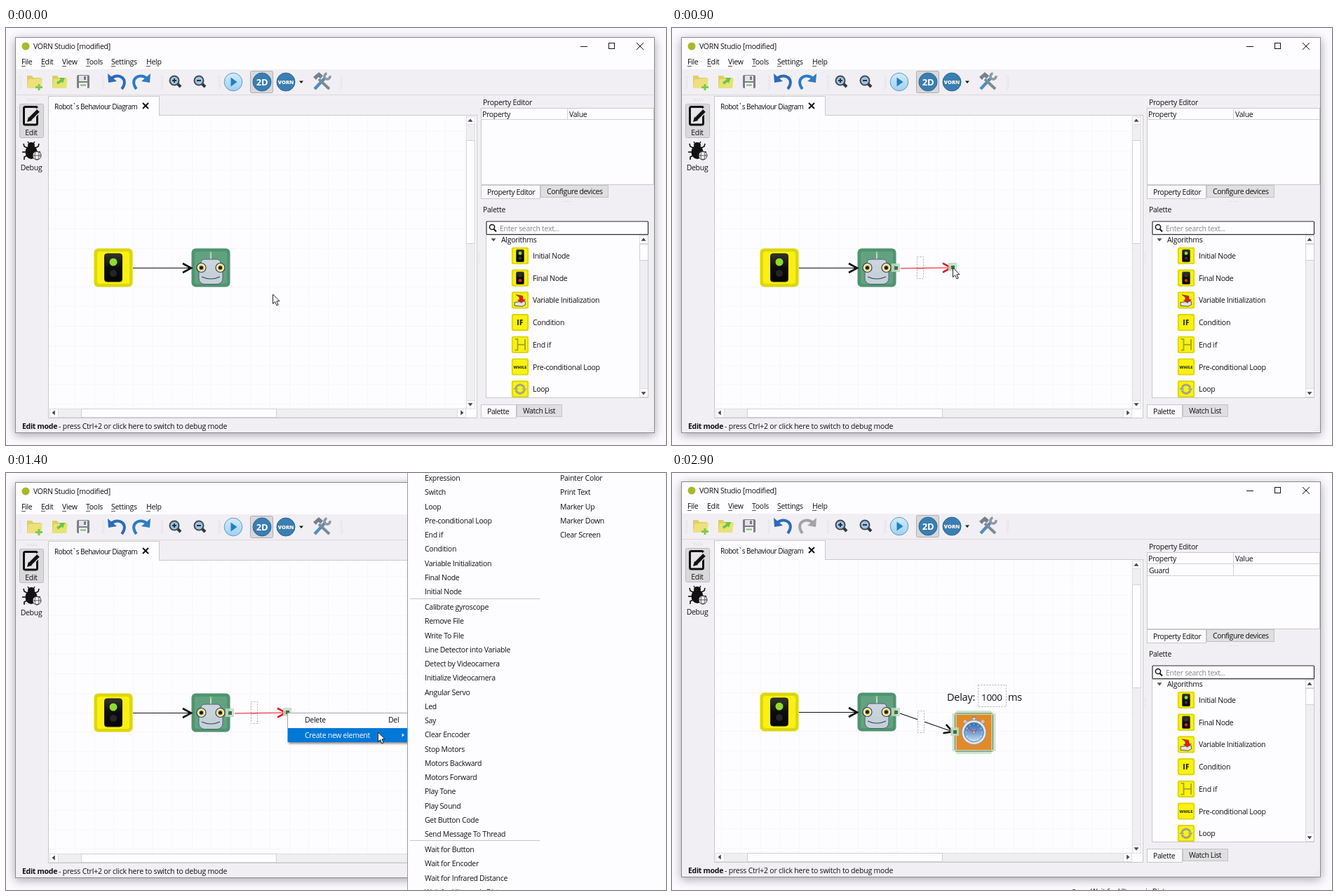
Animation, 941 px wide and 595 px high, one loop 4900 ms. Source, as an HTML page with a canvas:

```html
<!DOCTYPE html>
<html lang="en">
<head>
<meta charset="utf-8">
<title>Diagram editor</title>
<style>
html, body { margin: 0; width: 100%; height: 100%; overflow: hidden; background: #fcfaff; }
canvas { display: block; }
</style>
</head>
<body>
<canvas id="stage" width="941" height="595"></canvas>
<script>
const ctx = document.getElementById('stage').getContext('2d');
const LOOP = 4900, STEP = 100, LAST_STEP = 19, RESULT_AT = 2900;
const SANS = '"Open Sans", "Noto Sans", sans-serif';
const WHITE = '#fdfcff', PANEL = '#f1eff3', INK = '#111', EDGE = '#c9c8ca', BLUE = '#0078d7';

// ---- drawing helpers ----
function rect(x, y, w, h, fill, stroke) {
  if (fill) { ctx.fillStyle = fill; ctx.fillRect(x, y, w, h); }
  if (stroke) { ctx.strokeStyle = stroke; ctx.lineWidth = 1; ctx.strokeRect(x + .5, y + .5, w - 1, h - 1); }
}
function paint(fill, stroke, width = 1) {
  if (fill) { ctx.fillStyle = fill; ctx.fill(); }
  if (stroke) { ctx.strokeStyle = stroke; ctx.lineWidth = width; ctx.stroke(); }
}
function round(x, y, w, h, r, fill, stroke, width) {
  ctx.beginPath(); ctx.roundRect(x, y, w, h, r); paint(fill, stroke, width);
}
function oval(x, y, rx, ry, fill, stroke, width) {
  ctx.beginPath(); ctx.ellipse(x, y, rx, ry, 0, 0, 7); paint(fill, stroke, width);
}
const disc = (x, y, r, fill, stroke, width) => oval(x, y, r, r, fill, stroke, width);
function trace(points) {
  ctx.beginPath();
  for (let i = 0; i < points.length; i += 2) ctx.lineTo(points[i], points[i + 1]);
}
function poly(points, fill, stroke, width) { trace(points); ctx.closePath(); paint(fill, stroke, width); }
function line(points, color = INK, width = 1) { trace(points); paint(null, color, width); }
function arc(x, y, r, a, b, color, width) { ctx.beginPath(); ctx.arc(x, y, r, a, b); paint(null, color, width); }
function text(s, x, cy, { color = INK, size = 10.5, weight = 400, gap = -.29, align = 'left' } = {}) {
  ctx.font = `${weight} ${size}px ${SANS}`;
  ctx.letterSpacing = gap + 'px';
  ctx.textAlign = align;
  ctx.fillStyle = color;
  ctx.fillText(s, x, Math.round(cy + size * .36));
}
function vertical(y0, y1, ...colors) {
  const g = ctx.createLinearGradient(0, y0, 0, y1);
  colors.forEach((c, i) => g.addColorStop(i / (colors.length - 1), c));
  return g;
}
function at(x, y, scale, draw) {
  ctx.save(); ctx.translate(x, y); ctx.scale(scale, scale); draw(); ctx.restore();
}
function dashedBox(x, y, w, h) {
  ctx.setLineDash([2, 2]); rect(x, y, w, h, WHITE, '#aaaab2'); ctx.setLineDash([]);
}
function triangle(x, y, angle, color = '#444', r = 3) {
  ctx.save(); ctx.translate(x, y); ctx.rotate(angle);
  poly([-r, -r / 2, r, -r / 2, 0, r * .7], color);
  ctx.restore();
}
function dots(x, y, dx, dy, n) {
  for (let i = 0; i < n; i++) rect(x + dx * i, y + dy * i, 1, 1, '#cfced2');
}

// ---- icons ----
function yellowTile(size) {
  const h = size / 2;
  round(-h, -h, size, size, size * .11, '#ddd706');
  round(-h + size * .08, -h + size * .08, size * .84, size * .84, size * .07, '#f9f211');
}
function trafficLight(top, bottom) {
  round(-12.5, -20, 25, 40, 3.5, vertical(-20, 20, '#34342f', '#0d0d0d', '#050505'), '#222');
  disc(0, -8, 5.5, top);
  disc(0, 8, 5, bottom);
}
function robotFace() {
  line([0, -12, 0, -21], '#dfe7dc', 1.6);
  disc(0, -21.5, 1.7, '#8fcf6a');
  round(-14, -12, 28, 22, 5, '#ccd5dd', '#4b626c');
  round(-17, 3, 34, 20.5, [2, 2, 8, 8], '#c6d0d9', '#4b626c');
  rect(-13, -4, 26, 10, '#c9d3db');
  for (const x of [-13.5, 13.5]) {
    disc(x, 0, 6.5, '#f1efd4', '#3b403c', 1.2);
    disc(x, 0, 4, '#d9c64c');
    disc(x, 0, 2.6, '#1d1d1d');
  }
  ctx.beginPath(); ctx.moveTo(-13, 13); ctx.quadraticCurveTo(0, 19, 13, 13); paint(null, '#2f4650', 1.2);
}
function robotNode(square) {
  round(-27.5, -27.5, 55, 55, square ? 0 : 6, '#4f9470');
  round(-23, -23, 46, 46, 3, '#62a280');
  robotFace();
}
function stopwatch() {
  rect(-3, -22, 6, 6, '#d5d5da', '#77777c');
  line([-14, -17, -10, -12], '#c3c9cf', 4);
  line([14, -17, 10, -12], '#c3c9cf', 4);
  disc(0, 0, 17.5, '#e2e5ea', '#8a929c');
  disc(0, 0, 13.8, vertical(-14, 14, '#3168ac', '#6c9fd6', '#cfe2f5'), '#5b7da6');
  for (let i = 0; i < 12; i++) {
    const a = i * Math.PI / 6;
    disc(11.4 * Math.cos(a), 11.4 * Math.sin(a), .7, '#eef5ff');
  }
  line([-8, -6, 0, 0, 5, -4], '#c8474e', 1.3);
  disc(0, 0, 1.7, '#e8eef5', '#c8474e');
}
function curvedArrow(flip, color) {
  ctx.save(); ctx.scale(flip, 1);
  ctx.beginPath(); ctx.moveTo(-8, -4); ctx.bezierCurveTo(3, -13, 18, -3, 7, 11); paint(null, color, 4);
  poly([-13, -11, -12, 2, 0, 0], color);
  ctx.restore();
}
function magnifier(x, y, plus) {
  line([x + 4, y + 4, x + 9, y + 9], '#34383c', 4);
  disc(x, y, 6.5, '#9dc2df', '#454b50', 2);
  line([x - 3, y, x + 3, y], '#17344f', 2);
  if (plus) line([x, y - 3, x, y + 3], '#17344f', 2);
}
function folder(x, color) {
  poly([x, 68, x + 7, 68, x + 9, 71, x + 20, 71, x + 20, 86, x, 86], '#dccf63');
  poly([x + 2, 73, x + 22, 72, x + 20, 86, x, 86], color);
}
function bug() {
  for (const s of [-1, 1]) {
    line([s * 2, -8, s * 5, -13], INK, 1.4);
    line([s * 6, -4, s * 10, -6, s * 11, -10], INK, 1.6);
    line([s * 7, 2, s * 13, 2], INK, 1.6);
    line([s * 6, 7, s * 10, 9, s * 10, 13], INK, 1.6);
  }
  oval(0, 2, 8.5, 10, INK);
  oval(0, -8, 5, 4, INK);
  disc(8, 7, 6, PANEL, '#333');
  oval(8, 7, 3, 6, null, '#333', .8);
  line([2, 7, 14, 7], '#333', .8);
}
function wrenches() {
  line([440, 87, 455, 71], '#4f8fc0', 4.5);
  line([446, 73, 461, 87], '#7e8a94', 4);
  arc(458, 69, 4, -.2, 4.6, '#8c98a2', 3.5);
  poly([438, 70, 446, 63, 452, 68, 449, 72, 445, 70, 442, 74], '#75818b');
}
const paletteItems = [
  ['Initial Node', () => trafficLight('#8edb2c', '#333')],
  ['Final Node', () => trafficLight('#333', '#e02318')],
  ['Variable Initialization', () => {
    poly([-18, 7, 16, 3, 18, 14, 7, 20, -18, 18], '#e3e3e3', '#444', 2);
    poly([-14, -18, 8, -14, 10, -2, 17, -2, 4, 9, -8, 0, -2, -2, -3, -10], '#d22222', '#76201b');
  }],
  ['Condition', () => text('IF', 0, 0, { size: 22, weight: 800, gap: 1, align: 'center', color: '#35350c' })],
  ['End if', () => {
    line([-17, -18, -8, -18, -8, 18, -17, 18], '#a3a31f', 4);
    line([-8, 0, 14, 0], '#a3a31f', 4);
    line([16, -18, 16, 18], '#a3a31f', 4);
  }],
  ['Pre-conditional Loop', () => text('WHILE', 0, 0, { size: 13, weight: 800, gap: 0, align: 'center', color: '#35350c' })],
  ['Loop', () => {
    arc(0, 0, 14, .4, 2.9, '#a5a58c', 7);
    arc(0, 0, 14, 3.5, 6, '#a5a58c', 7);
    triangle(-14, -2, Math.PI, '#a5a58c', 8);
    triangle(14, 2, 0, '#a5a58c', 8);
  }]
];

// ---- window ----
function titleAndMenu() {
  ctx.save();
  ctx.shadowColor = 'rgba(0,0,0,.34)'; ctx.shadowBlur = 13; ctx.shadowOffsetY = 3;
  rect(13, 13, 912, 565, PANEL);
  ctx.restore();
  rect(13, 13, 911, 46, WHITE);
  disc(28, 26, 5.5, '#a9b82c');
  text('VORN Studio [modified]', 39, 26);
  line([819, 26.5, 829, 26.5]);
  rect(859, 21, 9, 9, null, INK);
  line([899, 21, 909, 31]); line([909, 21, 899, 31]);
  const menus = { File: 22, Edit: 50, View: 80, Tools: 114, Settings: 150, Help: 200 };
  for (const [name, x] of Object.entries(menus)) {
    text(name, x, 48);
    rect(x, 54, 6, 1, '#555');
  }
}
function toolbar(redoColor) {
  for (const x of [19, 137, 221, 303, 477]) { dots(x, 68, 0, 3, 7); dots(x + 2, 69, 0, 3, 6); }
  rect(13, 95, 911, 1, '#dad9dc');
  folder(30, '#eee07c');
  line([47, 80, 47, 89], '#7ccb4c', 3); line([42, 84.5, 52, 84.5], '#7ccb4c', 3);
  folder(66, '#e6e374');
  line([73, 79, 79, 75], '#6fc248', 3.5); poly([76, 71, 84, 71, 81, 79], '#6fc248');
  round(101, 67, 18, 19, 2, '#7b7f85');
  rect(104, 68, 12, 8, '#e4e4e8'); rect(104, 78, 12, 8, '#f3f2f5');
  rect(111, 69, 3, 5, '#7b7f85'); line([106, 81.5, 114, 81.5], '#7fb56f', 2);
  at(158, 76, 1, () => curvedArrow(1, '#2c6bb8'));
  at(193, 76, 1, () => curvedArrow(-1, redoColor));
  magnifier(240, 75, true); magnifier(275, 75, false);
  disc(324, 77, 12.8, vertical(64, 90, '#d3ebfa', '#9fd0f0'), '#5a9cc8');
  poly([320.5, 70.5, 329.5, 77, 320.5, 83.5], '#1f80c0');
  round(348.5, 61.5, 32, 31, 2, '#d8d7d9', '#b0afb2');
  disc(365, 77, 13, '#3a7eb2', '#286796');
  text('2D', 365, 77, { color: '#fff', size: 13, weight: 700, align: 'center' });
  disc(399, 77, 13, '#3a7eb2', '#286796');
  text('VORN', 399, 77, { color: '#fff', size: 7.5, weight: 800, gap: 0, align: 'center' });
  triangle(421, 77, 0, INK);
  wrenches();
}
function modeBar() {
  dots(30, 101, 3, 0, 5); dots(31, 103, 3, 0, 5);
  round(19.5, 108.5, 34, 48, 2, '#d9d8da', '#bcbbbe');
  round(25.5, 112.5, 19, 25.5, 2, '#e6e5e8', INK, 3);
  line([33, 131, 48, 116], '#d9d8da', 8);
  line([34, 130, 46, 118], INK, 5);
  poly([30, 134, 32, 127, 37, 132], INK);
  text('Edit', 36, 149, { align: 'center' });
  at(36, 175, 1, bug);
  text('Debug', 36, 199, { align: 'center' });
}
function scrollEnd(x, y, angle) { triangle(x, y, angle, '#444', 3.5); }
function editorFrame() {
  rect(60, 97, 159, 29, WHITE, EDGE);
  rect(60, 124, 612, 433, WHITE, EDGE);
  rect(61, 123, 157, 3, WHITE);
  text('Robot`s Behaviour Diagram', 69, 112, { size: 10, gap: -.5 });
  line([195, 107, 203, 115], INK, 2); line([203, 107, 195, 115], INK, 2);
  for (let x = 70; x < 655; x += 27.8) rect(Math.round(x), 126, 1, 417, '#f7f6fb');
  for (let y = 147; y < 542; y += 27.8) rect(62, Math.round(y), 594, 1, '#f7f6fb');
  rect(656, 126, 13, 418, '#efeef0', '#dddcdf');
  rect(656, 126, 13, 12, WHITE, '#dddcdf');
  rect(656, 160, 13, 148, WHITE, '#d0cfd2');
  rect(656, 531, 13, 13, WHITE, '#dddcdf');
  scrollEnd(662, 132, Math.PI); scrollEnd(662, 537, 0);
  rect(62, 543, 594, 13, '#efeef0', '#dddcdf');
  rect(62, 543, 13, 13, WHITE, '#dddcdf');
  rect(107, 543, 279, 13, WHITE, '#d0cfd2');
  rect(643, 543, 13, 13, WHITE, '#dddcdf');
  scrollEnd(68, 549, Math.PI / 2); scrollEnd(650, 549, -Math.PI / 2);
}
function dockTabs(y, first, split, second, end) {
  rect(677, y, split - 677, 20, '#f9f8fa', EDGE);
  rect(split, y, end - split, 18, '#dfdee0', '#c2c1c4');
  text(first, 686, y + 10.5, { gap: -.4 }); text(second, split + 9, y + 9.5, { gap: -.4 });
}
function docks(guard) {
  dots(674, 322, 0, 3, 5);
  text('Property Editor', 680, 106);
  rect(677, 114, 247, 110, WHITE, EDGE);
  rect(677, 130, 247, 1, '#cfced1');
  rect(800, 115, 1, guard ? 33 : 16, '#d3d2d5');
  text('Property', 679, 123); text('Value', 803, 123);
  if (guard) { text('Guard', 680, 140); rect(678, 147, 245, 1, '#d3d2d5'); }
  dockTabs(224, 'Property Editor', 762, 'Configure devices', 859);
  dots(794, 247, 3, 0, 5);
  text('Palette', 680, 259.5);
  rect(684, 295, 232, 233, WHITE, EDGE);
  round(685, 276, 230.5, 18.5, 1, WHITE, '#2d2d2d', 1.2);
  disc(693, 284, 3.6, null, INK, 1.5); line([695.5, 287, 699, 290.5], INK, 2);
  text('Enter search text...', 704, 286, { color: '#88878b' });
  ctx.save();
  ctx.beginPath(); ctx.rect(685, 296, 230, 231); ctx.clip();
  triangle(695, 302, 0, '#555', 3.5);
  text('Algorithms', 706, 302.5);
  paletteItems.forEach(([label, icon], i) => {
    const y = 325 + i * 31.7;
    at(733, y, .44, () => { yellowTile(55); icon(); });
    text(label, 751, y + .3);
  });
  rect(903, 296, 13, 231, '#efeef0', '#dddcdf');
  rect(903, 296, 13, 12, WHITE, '#dddcdf');
  rect(903, 308, 13, 24, WHITE, '#d0cfd2');
  rect(903, 514, 13, 13, WHITE, '#dddcdf');
  scrollEnd(909, 302, Math.PI); scrollEnd(909, 521, 0);
  ctx.restore();
  dockTabs(537, 'Palette', 728, 'Watch List', 793);
}
function statusBar() {
  text('Edit mode', 23, 568.5, { weight: 700 });
  text('- press Ctrl+2 or click here to switch to debug mode', 75, 568.5, { gap: -.2 });
  for (let i = 0; i < 3; i++) dots(921 - 3 * i, 568 + 3 * i, 0, 3, 3 - i);
  rect(13, 13, 912, 565, null, '#8b8a8d');
}

// ---- diagram ----
function arrow(x0, y0, x1, y1, color) {
  line([x0, y0, x1, y1], color, 1.2);
  ctx.save(); ctx.translate(x1, y1); ctx.rotate(Math.atan2(y1 - y0, x1 - x0));
  line([-12, -6.5, 0, 0, -12, 6.5], color, 2.6);
  ctx.restore();
}
function port(x, y) {
  rect(x - 6, y - 6, 12, 12, 'rgba(190,220,194,.85)');
  rect(x - 2, y - 2, 5, 5, '#3d704a');
}
function halo(x, y) {
  const strip = 'rgba(200,226,201,.9)', dark = '#58836a';
  for (const s of [-1, 1]) {
    rect(x + s * 28 - 3, y - 27, 6, 54, strip);
    rect(x - 25, y + s * 28 - 3, 50, 6, strip);
    rect(x + s * 27 - .5, y - 25, 1, 50, dark);
    rect(x - 25, y + s * 27 - .5, 50, 1, dark);
  }
}
function nodes(hover) {
  at(153, 342, 1, () => { yellowTile(55); trafficLight('#8edb2c', '#252525'); });
  at(292, 342, 1, () => robotNode(hover));
  if (hover) {
    halo(292, 342);
    rect(317, 367, 4, 4, '#1747c8');
    disc(337, 337, 5.5, '#4d8ccd', '#2f68a5');
  }
  arrow(181, 342.5, 264, 342.5, INK);
}
function redLink(x, y) {
  arrow(326, 343, x - 2, y, '#e0151f');
  dashedBox(349, 326, 10, 32);
  line([349, 342.8, 359, 342.6], '#e0151f', 1.2);
  port(319, 342);
  port(x, y - 1);
}
function delayNode() {
  arrow(325, 344, 400, 370, INK);
  dashedBox(350, 340, 10, 32);
  port(319, 342);
  at(430.5, 371, 1, () => {
    rect(-27, -28, 54, 56, '#e18a29');
    halo(0, 0);
    stopwatch();
  });
  port(403, 370);
  const big = { size: 14.6, gap: -.3 };
  text('Delay:', 392, 320.5, big);
  dashedBox(436, 303, 41, 32);
  text('1000', 441, 321.5, { size: 13.5, gap: -.3 });
  text('ms', 479, 320.5, big);
}

// ---- menus and pointer ----
const groups = [
  [7, ['Expression', 'Switch', 'Loop', 'Pre-conditional Loop', 'End if', 'Condition', 'Variable Initialization', 'Final Node', 'Initial Node']],
  [191, ['Calibrate gyroscope', 'Remove File', 'Write To File', 'Line Detector into Variable', 'Detect by Videocamera',
    'Initialize Videocamera', 'Angular Servo', 'Led', 'Say', 'Clear Encoder', 'Stop Motors', 'Motors Backward',
    'Motors Forward', 'Play Tone', 'Play Sound', 'Get Button Code', 'Send Message To Thread']],
  [537, ['Wait for Button', 'Wait for Encoder', 'Wait for Infrared Distance', 'Wait for Ultrasonic Distance']]
];
const markerItems = ['Painter Color', 'Print Text', 'Marker Up', 'Marker Down', 'Clear Screen'];
const hotItems = { 16: 'Play Sound', 17: 'Send Message To Thread', 18: 'Wait for Infrared Distance' };

function contextMenu(row) {
  ctx.save();
  ctx.shadowColor = 'rgba(0,0,0,.5)'; ctx.shadowBlur = 3; ctx.shadowOffsetX = ctx.shadowOffsetY = 2;
  rect(401, 342, 172, 42, WHITE);
  ctx.restore();
  rect(401, 342, 172, 42, null, '#aaa9ac');
  if (row >= 0) rect(402, 342 + row * 22, 170, 20, BLUE);
  const color = r => r === row ? '#fff' : INK;
  text('Delete', 426, 352.5, { color: color(0) });
  text('Del', 545, 352.5, { color: color(0) });
  text('Create new element', 426, 374.5, { color: color(1) });
  triangle(566, 374, -Math.PI / 2, row === 1 ? '#d5e9fa' : '#555', 2.8);
}
function subMenu(hot) {
  rect(572, 0, 369, 595, WHITE);
  rect(572, 0, 1, 595, '#99989b');
  rect(576, 179, 185, 1, '#c6c5c8');
  rect(576, 524, 185, 1, '#c6c5c8');
  for (const [top, items] of groups) items.forEach((name, i) => {
    const y = top + i * 20.25;
    if (name === hot) rect(573, Math.round(y) - 10, 192, 20, BLUE);
    text(name, 597, y + .3, { color: name === hot ? '#fff' : INK });
  });
  markerItems.forEach((name, i) => text(name, 790, 7.3 + i * 20.25));
}
function pointer(x, y) {
  at(x, y, 1, () => poly([.5, 0, .5, 13.5, 3.6, 10.6, 6, 16, 8.2, 15, 5.9, 9.8, 10, 9.6], '#fff', '#222'));
}
const path = [[0, 380, 380], [2, 318, 352], [3, 308, 347], [5, 336, 337], [6, 339, 338], [9, 400, 342],
  [11, 416, 350], [12, 455, 371], [14, 530, 370], [17, 640, 533], [18, 645, 575]];
function pointerAt(step) {
  const i = path.findIndex(p => p[0] >= step);
  if (i < 1) return path[0].slice(1);
  const [s0, x0, y0] = path[i - 1], [s1, x1, y1] = path[i];
  const k = (step - s0) / (s1 - s0);
  return [x0 + (x1 - x0) * k, y0 + (y1 - y0) * k];
}

function drawScene(step, done) {
  rect(0, 0, 941, 595, '#fcfaff');
  const linked = step >= 10;
  ctx.save();
  if (done) ctx.translate(0, -1);
  titleAndMenu();
  toolbar(done ? '#a2a3a6' : '#2c7cc2');
  modeBar();
  editorFrame();
  docks(linked);
  statusBar();
  nodes(step >= 2 && step <= 5);
  if (done) delayNode();
  ctx.restore();
  if (done) {
    rect(571, 594, 4, 1, '#555');
    text('Wait for Ultrasonic Distance', 597, 597.5);
    return;
  }
  const [x, y] = pointerAt(Math.min(step, 18));
  if (linked) {
    redLink(401, 342);
    contextMenu(step === 10 ? -1 : step === 11 ? 0 : 1);
    if (step >= 12) subMenu(hotItems[step]);
  } else if (step >= 6) {
    redLink(x, y);
  }
  if (step < LAST_STEP) pointer(x, y);
}

const start = performance.now();
let shown = '';
function tick(now) {
  const t = Math.max(0, now - start) % LOOP;
  const step = Math.min(Math.floor(t / STEP), LAST_STEP), done = t >= RESULT_AT;
  const key = step + ':' + done;
  if (key !== shown) { shown = key; drawScene(step, done); }
  requestAnimationFrame(tick);
}
tick(start);
</script>
</body>
</html>
```
